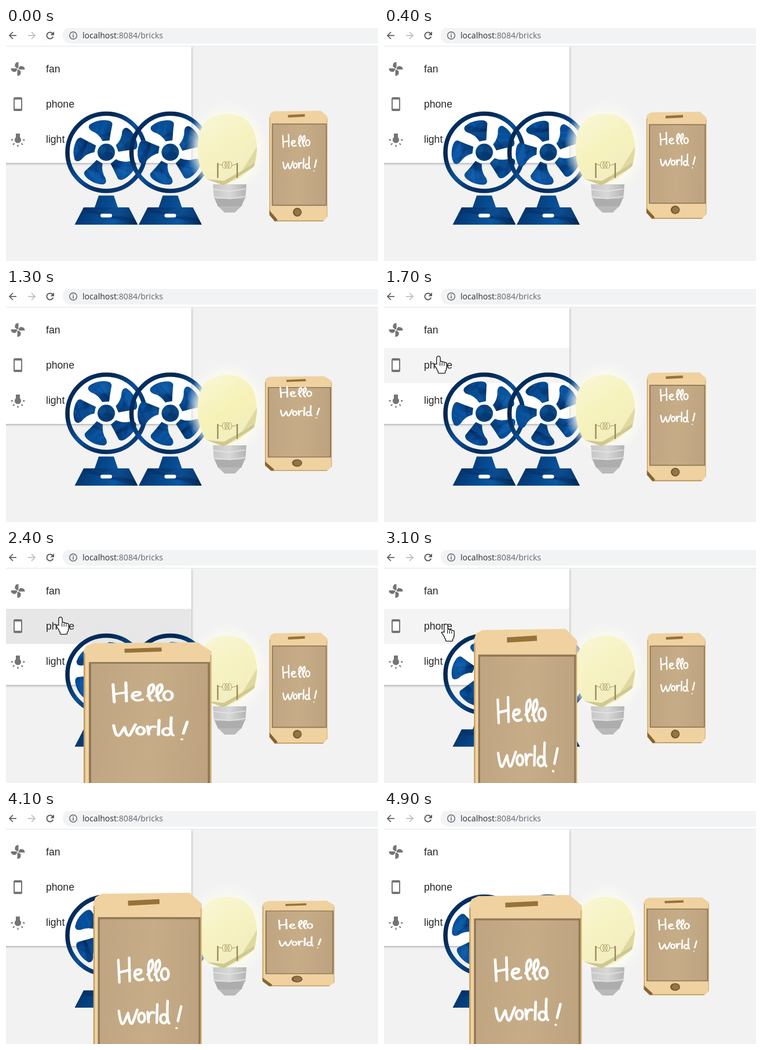
Recreate the animation shown at these times as an HTML page with a canvas. Size 642 by 404 pixels, loop 5 s.

```html
<!DOCTYPE html>
<html lang="en">
<head>
<meta charset="utf-8">
<title>bricks</title>
<style>
html, body { margin: 0; width: 100%; height: 100%; overflow: hidden; background: #f2f2f2; }
canvas { display: block; }
</style>
</head>
<body>
<canvas id="stage" width="642" height="404"></canvas>
<script>
const g = document.getElementById('stage').getContext('2d');
const LOOP = 5000, STEP = 100, POP = 2200;
const ICON = '#757575';

// Motion helpers: a smooth rise from 0 to 1, and a soft pulse around a time.
function ramp(t, from, to) {
  const u = Math.min(1, Math.max(0, (t - from) / (to - from)));
  return u * u * (3 - 2 * u);
}
const pulse = (t, mid, width) => Math.exp(-(((t - mid) / width) ** 2));

function random(seed) {
  return () => (seed = (seed * 16807) % 2147483647) / 2147483647;
}

function at(x, y, paint) {
  g.save();
  g.translate(x, y);
  paint();
  g.restore();
}
function poly(pts, fill) {
  g.beginPath();
  pts.forEach(p => g.lineTo(...p));
  g.closePath();
  g.fillStyle = fill;
  g.fill();
}
function line(pts, color, w) {
  g.beginPath();
  pts.forEach(p => g.lineTo(...p));
  g.strokeStyle = color;
  g.lineWidth = w;
  g.stroke();
}
function oval(x, y, rx, ry, fill) {
  g.beginPath();
  g.ellipse(x, y, rx, ry, 0, 0, 7);
  if (fill) { g.fillStyle = fill; g.fill(); } else g.stroke();
}
function box(x, y, w, h, r, fill) {
  g.beginPath();
  g.roundRect(x, y, w, h, r);
  g.fillStyle = fill;
  g.fill();
}
// Symmetric trapezoid around x = 0.
const trap = (y0, y1, w0, w1) => [[-w0, y0], [w0, y0], [w1, y1], [-w1, y1]];

function text(s, x, y, font, color) {
  g.font = font;
  g.fillStyle = color;
  g.fillText(s, x, y);
  return x + g.measureText(s).width;
}
function blend(x0, y0, x1, y1, ...colors) {
  const f = g.createLinearGradient(x0, y0, x1, y1);
  colors.forEach((c, i) => f.addColorStop(i / (colors.length - 1), c));
  return f;
}

// Low-poly shading over the current path.
function facets(x, y, w, h, rnd) {
  g.save();
  g.clip();
  const spot = () => [x + w * (rnd() * 1.4 - 0.2), y + h * (rnd() * 1.4 - 0.2)];
  for (let i = 0; i < 6; i++)
    poly([spot(), spot(), spot()], i % 2 ? 'rgba(30,110,185,.22)' : 'rgba(0,22,60,.22)');
  g.restore();
}

function browserBar() {
  g.fillStyle = '#fff';
  g.fillRect(0, 0, 642, 31);
  g.fillStyle = '#e2e4e6';
  g.fillRect(0, 31, 642, 1);
  box(98, -2, 600, 29, 14, '#f1f3f4');
  const arrow = (x, d, c) => {
    line([[x - 6, 13], [x + 6, 13]], c, 1.7);
    line([[x, 13 - 6], [x + 6 * d, 13], [x, 13 + 6]], c, 1.7);
  };
  arrow(12, -1, '#55595d');
  arrow(44, 1, '#b9bbbd');
  g.strokeStyle = '#55595d';
  g.lineWidth = 1.9;
  g.beginPath();
  g.arc(76, 13, 5.6, 0.35, 5.5);
  g.stroke();
  poly([[83, 6], [83, 12.5], [76.5, 12.5]], '#55595d');
  g.strokeStyle = '#5f6368';
  g.lineWidth = 1.4;
  oval(116, 13, 6.3, 6.3);
  line([[116, 9.4], [116, 11]], '#5f6368', 1.6);
  line([[116, 12], [116, 16.6]], '#5f6368', 1.6);
  const font = '14.1px "Open Sans", sans-serif';
  const x = text('localhost', 132, 18, font, '#2b2e31');
  text(':8084/bricks', x, 18, font, '#63676b');
}

function fanIcon() {
  for (let i = 0; i < 4; i++) {
    g.beginPath();
    g.moveTo(0, 0);
    g.lineTo(-5, -4);
    g.quadraticCurveTo(-6, -12, 1, -12);
    g.lineTo(1, -3);
    g.fillStyle = ICON;
    g.fill();
    g.rotate(Math.PI / 2);
  }
  oval(0, 0, 1.5, 1.5, '#fff');
}
function phoneIcon() {
  box(-7.5, -12, 15, 24, 2.5, ICON);
  g.fillStyle = '#fff';
  g.fillRect(-5.5, -8, 11, 16);
}
function lightIcon() {
  oval(0, 1, 5.6, 5.6, ICON);
  box(-3.5, -10, 7, 8, 0, ICON);
  g.translate(0, 1);
  g.rotate(-Math.PI / 2);
  for (let i = 0; i < 5; i++) {
    line([[0, 8.5], [0, 12]], ICON, 2);
    g.rotate(Math.PI / 4);
  }
}

function menu(hover, press) {
  g.save();
  g.shadowColor = 'rgba(0,0,0,.38)';
  g.shadowBlur = 4;
  g.shadowOffsetY = 1;
  g.fillStyle = '#fff';
  g.fillRect(-4, 32, 324, 202);
  g.restore();
  if (hover >= 0 && hover < 3) {
    const c = 244 - 13 * press;
    g.fillStyle = `rgb(${c},${c},${c})`;
    g.fillRect(0, 41 + 61 * hover, 320, 61);
  }
  const font = '17.6px "Liberation Sans", Arial, sans-serif';
  [fanIcon, phoneIcon, lightIcon].forEach((icon, i) => {
    text(['fan', 'phone', 'light'][i], 69, 77 + 61 * i, font, '#262626');
    at(20.5, 71 + 61 * i, icon);
  });
}

function blade(rnd) {
  g.beginPath();
  g.moveTo(-5, -20);
  g.quadraticCurveTo(-10, -33, -23, -39);
  g.quadraticCurveTo(-30, -45, -25, -50);
  g.quadraticCurveTo(-14, -57, 0, -56);
  g.quadraticCurveTo(14, -55, 14, -48);
  g.quadraticCurveTo(10, -34, 7, -20);
  g.closePath();
  g.fillStyle = blend(-24, -50, 12, -24, '#064a94', '#07509c', '#02386f');
  g.fill();
  facets(-30, -58, 46, 38, rnd);
}

function fan(x, turn) {
  const rnd = random(77);
  at(x, 215.5, () => {
    g.strokeStyle = blend(-60, -60, 55, 60, '#02336c', '#01264f', '#0b4f97', '#022a5a', '#0a4688');
    g.lineWidth = 7.5;
    oval(0, 0, 67, 67);

    at(0, 0, () => {
      g.rotate(turn * Math.PI / 180);
      for (let i = 0; i < 5; i++) {
        blade(rnd);
        g.rotate(Math.PI * 0.4);
      }
    });
    oval(0, 0, 18, 18, '#fff');
    oval(0, 0, 15, 15, '#07427f');
    facets(-15, -15, 30, 30, rnd);

    const blue = blend(-45, 80, 50, 125, '#03326a', '#054486', '#0a57a2', '#02305f');
    poly(trap(75, 95.5, 13, 20), blue);
    poly(trap(95.5, 125.5, 39, 54.5), blue);
    facets(-50, 90, 100, 36, rnd);
    box(-10, 106.5, 20, 6.5, 3.2, '#fff');
  });
}

function halo(glow) {
  const f = g.createRadialGradient(0, 0, 40, 0, 0, 72);
  f.addColorStop(0, `rgba(255,252,215,${0.7 + 0.2 * glow})`);
  f.addColorStop(0.45, 'rgba(251,251,240,.75)');
  f.addColorStop(1, 'rgba(248,248,248,0)');
  g.scale(1, 1.15);
  oval(0, 0, 72, 72, f);
}

function bulb(glow) {
  at(383, 208, () => halo(glow));

  at(386, 0, () => {
    poly(trap(271, 296, 29, 27), blend(-29, 0, 28, 0, '#c6c6c6', '#d8d8d8', '#b4b4b4'));
    poly(trap(296, 310, 26, 20), '#adadad');
    poly(trap(309, 320, 20, 9), '#b9b9b9');
    for (const y of [280, 293]) line([[-28, y], [0, y + 3], [27, y - 1]], '#e4e4e4', 1.5);
  });

  g.beginPath();
  g.moveTo(331, 215);
  g.bezierCurveTo(329, 172, 345, 149, 383, 149);
  g.bezierCurveTo(418, 149, 434, 175, 433, 216);
  g.lineTo(429, 239);
  g.lineTo(402, 261);
  g.lineTo(376, 273);
  g.lineTo(346, 262);
  g.quadraticCurveTo(332, 242, 331, 215);
  g.fillStyle = blend(345, 160, 415, 260, '#f8f6d2', `rgb(246,242,${200 - 20 * glow})`, '#f1ecc0');
  g.fill();
  g.save();
  g.clip();
  poly([[434, 205], [428, 241], [374, 274], [346, 262], [376, 265], [408, 247]], '#cfc88f');
  poly([[434, 205], [430, 233], [408, 247]], '#dfd9a0');
  g.restore();

  for (const x of [365.5, 399]) line([[x, 234], [x, 260]], '#98845a', 2.3);
  g.strokeStyle = '#aa9c68';
  g.lineWidth = 1;
  for (let i = 0; i < 3; i++) oval(377 + 4.5 * i, 237.5, 3.6, 6);
  line([[366, 236], [374, 238]], '#aa9c68', 1);
  line([[390, 238], [399, 236]], '#aa9c68', 1);
}

// One pen stroke through control points, as steps from its start.
function pen(x, y, ...steps) {
  g.beginPath();
  g.moveTo(x, y);
  for (const [dx, dy, bx = dx / 2, by = dy / 2] of steps) {
    g.quadraticCurveTo(x + bx, y + by, x + dx, y + dy);
    x += dx;
    y += dy;
  }
  g.stroke();
}
function words(y) {
  at(0, y, () => {
    g.strokeStyle = '#fff';
    g.lineWidth = 2.4;
    g.lineCap = g.lineJoin = 'round';
    pen(23, -9, [1, 20]);
    pen(33, -11, [0.5, 21]);
    pen(24, 2, [9.5, -2]);
    pen(38, 4, [6, -4, 7, 0], [-6, 5, -6, -2], [8, 3, 2, 6]);
    for (const x of [50, 56.5]) pen(x, 4, [4, -13, 7, -7], [-3, 11, -4, 1], [3, 7, 1, 9]);
    oval(66, 3.5, 3.4, 5);

    pen(23.5, 37, [5, 10, 2, 16], [3.5, -8], [4.5, 8, 2, 13], [4, -11]);
    oval(44.5, 43, 3, 4.2);
    pen(50, 38, [1, 9]);
    pen(51, 43, [5, -4.5, 1, -6]);
    pen(59, 31, [-0.5, 16.5]);
    oval(65, 44, 3.2, 4);
    pen(68.5, 28, [1.5, 20, -1, 19]);
    pen(81, 33, [-3, 13]);
    oval(76.8, 52.5, 1.2, 1.1, '#fff');
  });
}

// Drawn in a 100 x 192 box, scaled into place.
function phone(cx, top, sx, sy, textY) {
  g.save();
  g.translate(cx, top);
  g.scale(sx, sy);
  g.translate(-50, 0);
  poly([[2, 4], [8, 1], [89, 0], [100, 10], [100, 184], [93, 192], [10, 192], [0, 179], [0, 9]], '#efd2a0');
  line([[0.6, 12], [0.6, 176]], '#c39c5f', 1.2);
  line([[99.4, 14], [99.4, 184]], '#d9b67c', 1.2);
  poly([[0, 173], [13, 188], [14, 192], [9, 192], [0, 181]], '#86642f');
  line([[12, 191.2], [93, 191.2]], '#b9904e', 1.6);
  line([[32, 9.5], [61, 8]], '#977239', 4.5);

  g.fillStyle = blend(5, 90, 98, 95, '#bfa581', '#c6ad88', '#bda37f');
  g.fillRect(5, 23, 93, 141);
  g.strokeStyle = '#907856';
  g.lineWidth = 1.8;
  g.strokeRect(5, 23, 93, 141);

  oval(48, 176, 7.6, 7.6, '#765a34');
  oval(48.5, 176, 5.6, 5.6, '#957445');
  words(textY);
  g.restore();
}

// Wider and shorter as the squash grows.
function squashed(cx, top, drop, sx, sy, k, textY) {
  phone(cx, top + drop * k, sx * (1 + 0.25 * k), sy * (1 - 0.236 * k), textY);
}

function hand(x, y) {
  at(x, y, () => {
    const shape = new Path2D();
    shape.roundRect(-2.5, -1, 5, 20, 2.5);
    for (let i = 0; i < 3; i++) shape.roundRect(2.5 + 3.6 * i, 8 + i, 3.8, 10, 1.8);
    shape.roundRect(-2, 14, 15, 10, 3);
    shape.roundRect(0, 18, 11, 9.5, 1);
    shape.moveTo(-7, 13);
    shape.lineTo(-3, 13);
    shape.lineTo(2, 20);
    shape.lineTo(1, 25);
    shape.closePath();
    g.lineJoin = 'round';
    g.strokeStyle = '#111';
    g.lineWidth = 2.6;
    g.stroke(shape);
    g.fillStyle = '#fff';
    g.fill(shape);
    for (let i = 0; i < 3; i++) line([[2.6 + 3.6 * i, 9 + i], [2.6 + 3.6 * i, 15]], '#111', 1.1);
  });
}

function draw(t) {
  const enter = ramp(t, 1350, 1650), drift = ramp(t, 2700, 3050), leave = ramp(t, 3700, 4000);
  const handX = 110 - 16 * enter + 13 * drift - 40 * leave;
  const handY = -40 + 158 * enter + 12 * drift - 170 * leave;
  const press = ramp(t, 1900, 2150) - ramp(t, 2500, 2800);

  g.lineCap = 'butt';
  g.lineJoin = 'miter';
  g.fillStyle = '#f2f2f2';
  g.fillRect(0, 0, 642, 404);
  menu(Math.floor((handY - 41) / 61), press);
  browserBar();

  const turn = 0.165 * t - 4;
  fan(173, turn);
  fan(283.5, turn - 5);
  bulb(0.35 + 0.6 * pulse(t, 1150, 700));

  const k = pulse(t, 1000, 430) + 1.15 * pulse(t, 4350, 600);
  const sway = 16 * pulse(t, 2400, 350) - 21 * pulse(t, 1250, 700);
  squashed(504.7, 143.5, 12.5, 1, 1, k, 53 + sway);
  if (t >= POP) {
    const land = pulse(t, 2400, 300);
    const sag = 0.4 * pulse(t, 4900, 1100);
    squashed(244.3, 136, 24, 1.765, 2.03, land + sag, 70 - 14 * land);
  }
  hand(handX, handY);
}

const start = performance.now();
function tick() {
  const t = (performance.now() - start) % LOOP;
  draw(Math.floor(t / STEP) * STEP);
  requestAnimationFrame(tick);
}
tick();
</script>
</body>
</html>
```
